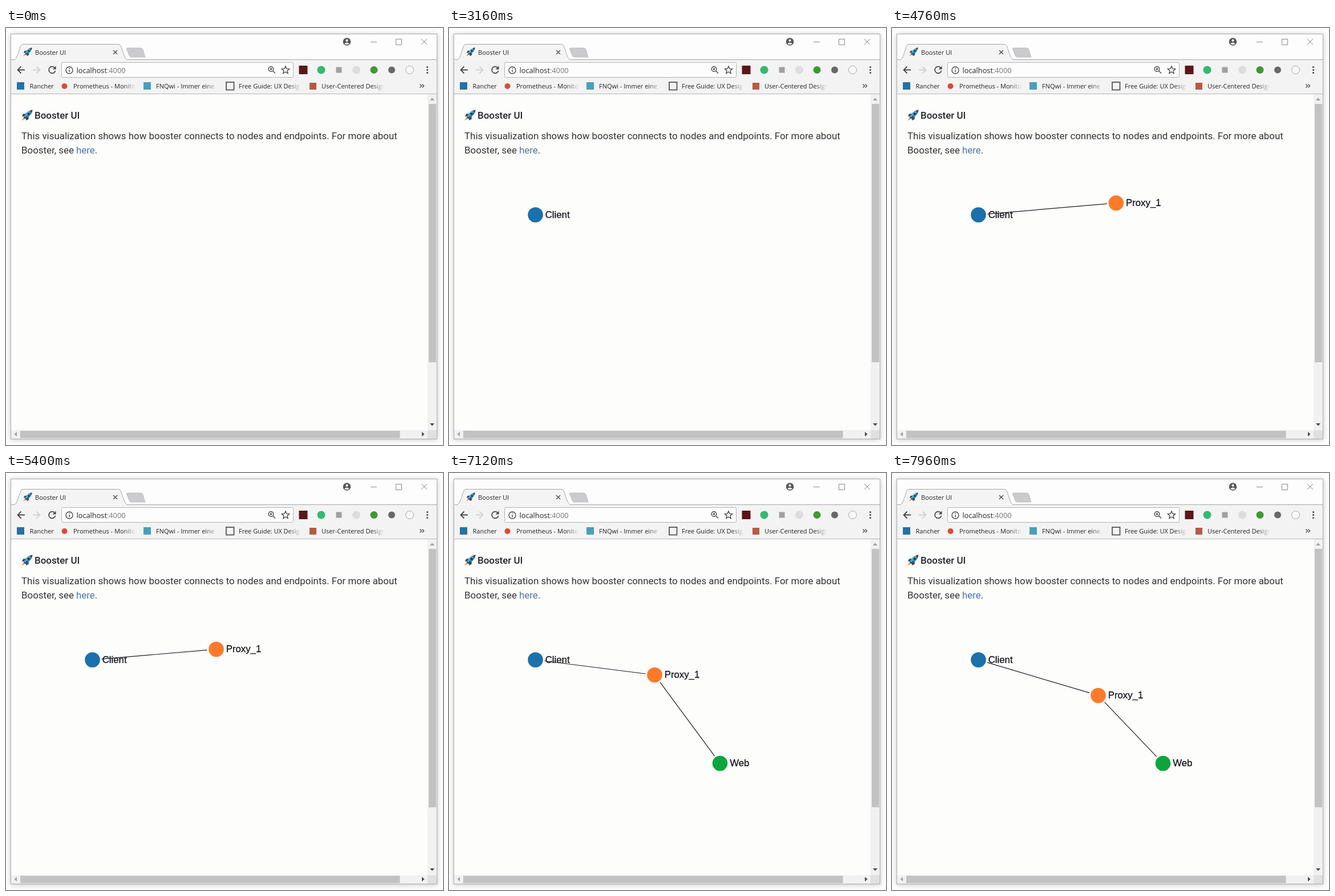
Write an HTML page that moves like this. It is 766x731 px and loops after 8000 ms.

```html
<!DOCTYPE html>
<html lang="en">
<head>
<meta charset="utf-8">
<title>Booster UI</title>
<style>
  html, body { margin: 0; width: 100%; height: 100%; overflow: hidden; background: #fefefe; }
  .window {
    position: absolute; left: 8px; top: 10px; width: 746px; height: 709px;
    border: 1px solid #ababab; background: #fdfdfd;
    box-shadow: 0 1px 9px rgba(0, 0, 0, .22);
  }
  svg { position: absolute; left: 0; top: 0; width: 766px; height: 731px; }
  .ui { font: 11px "Open Sans", sans-serif; fill: #242426; }
  .page { font: 16.9px Roboto, sans-serif; fill: #333335; }
  .node text { font: 16.8px "Liberation Sans", Arial, sans-serif; fill: #15151c; stroke: #15151c; stroke-width: .3; }
  .icon { fill: none; stroke: #4a4a4c; stroke-width: 1.8; }
  .fine { stroke-width: 1.4; }
  .thin { fill: none; stroke: #8a8a8c; stroke-width: 1; }
  .link { stroke: #1c1c20; stroke-width: 1.2; }
</style>
</head>
<body>
<div class="window"></div>
<svg viewBox="0 0 766 731">
  <defs>
    <linearGradient id="fade">
      <stop offset="0" stop-color="#f3f3f3" stop-opacity="0"/>
      <stop offset="1" stop-color="#f3f3f3"/>
    </linearGradient>
    <symbol id="rocket" viewBox="0 0 20 20">
      <path d="M5 12 0 19.5 8 15Z" fill="#f08a3c"/>
      <path d="M8 7 3 7.5 1 12 6 12ZM13 12 12.5 17 8 19 8 14Z" fill="#3d4a5c"/>
      <path d="M19.5 .5C13 1 7 6 4.5 13L7 15.5C14 13 19 7 19.5 .5Z" fill="#2b86b4"/>
      <path d="M19.5 .5C13 1 7 6 4.5 13L5.7 14.2Z" fill="#4fa9d0"/>
      <path d="M19.5 .5 14.5 2 18 5.5Z" fill="#5b3540"/>
      <circle cx="12.5" cy="7.5" r="2" fill="#20303f"/>
      <path d="M4.5 13 7 15.5 10 12" fill="none" stroke="#26364a" stroke-width="1.3"/>
    </symbol>
  </defs>

  <!-- toolbar and tab -->
  <path d="M9 56H755V115H9Z" fill="#f3f3f3"/>
  <path d="M9 55.5H15C19 54 22 42 25.5 32Q26.5 28.5 30 28.5H196Q200 28.5 201.5 32C205 42 208 54 212 55.5H755" fill="#f4f4f4" stroke="#a6a6a8"/>
  <path d="M213 35H236Q239 35 240 38L244 51H220Q217 51 216 48L211.5 37Q211 35 213 35Z" fill="#cbcbcd" stroke="#b6b6b8" stroke-width=".8"/>
  <path d="M9 115.5H755" stroke="#b4b4b6"/>
  <use href="#rocket" x="30" y="34" width="16" height="16"/>
  <text class="ui" x="51" y="46.5">Booster UI</text>
  <path class="icon fine" d="m188 39 7 7m0-7-7 7"/>

  <!-- window controls -->
  <circle cx="597.5" cy="24" r="6.8" fill="#55555a"/>
  <circle cx="597.5" cy="21.8" r="2.1" fill="#fff"/>
  <path d="M593.3 27.5Q597.5 23.5 601.7 27.5Q597.5 30.5 593.3 27.5Z" fill="#fff"/>
  <path class="thin" d="M639 24.5H650M683.5 19.5H693.5V29.5H683.5ZM728 19 738 29M738 19 728 29"/>

  <!-- navigation -->
  <path class="icon" d="M33 73.5H21M26.5 67.5 20.5 73.5 26.5 79.5"/>
  <path class="icon" d="M47 73.5H59M53.5 67.5 59.5 73.5 53.5 79.5" style="stroke:#d2d2d4"/>
  <path class="icon" d="M85.5 70A5.8 5.8 0 1 0 86.5 75"/>
  <path d="M87.5 66.5V72.5H81.5Z" fill="#4a4a4c"/>
  <rect x="97.5" y="60.5" width="406" height="26" rx="2" fill="#fdfdfd" stroke="#b2b2b4"/>
  <g class="icon fine">
    <circle cx="111" cy="74" r="6"/>
    <path d="M111 73V77.5M111 70V71.6"/>
    <circle cx="464.5" cy="72" r="4.3"/>
    <path d="m467.8 75.3 4.2 4.2M462.5 72h4M464.5 70v4"/>
    <path d="m490 67 1.9 4.4 4.7.4-3.6 3.1 1.1 4.6-4.1-2.5-4.1 2.5 1.1-4.6-3.6-3.1 4.7-.4Z"/>
  </g>
  <text class="ui" x="123.5" y="78.5" style="font-size:12.75px">localhost<tspan fill="#77777a">:4000</tspan></text>

  <!-- extensions -->
  <rect x="513.5" y="66" width="15" height="15" fill="#5c1518"/>
  <circle cx="552.5" cy="73.5" r="7" fill="#35b96f"/>
  <rect x="578.5" y="68.5" width="10" height="10" fill="#a0a0a2"/>
  <circle cx="614" cy="73.5" r="7" fill="#dddddf"/>
  <circle cx="645" cy="73.5" r="6.5" fill="#3d9a2f"/>
  <circle cx="676" cy="73.5" r="6" fill="#68686a"/>
  <circle cx="707.5" cy="73.5" r="7" fill="#f8f8f8" stroke="#a5a5a7"/>
  <g fill="#4a4a4c">
    <circle cx="738.5" cy="68.5" r="1.6"/>
    <circle cx="738.5" cy="73.5" r="1.6"/>
    <circle cx="738.5" cy="78.5" r="1.6"/>
  </g>

  <!-- bookmarks -->
  <rect x="19" y="95" width="13" height="13" fill="#2672a3"/>
  <circle cx="102.5" cy="102" r="5" fill="#dc4a38"/>
  <rect x="241" y="95" width="13" height="13" fill="#4a9fb8"/>
  <rect class="icon" x="386" y="95" width="13.5" height="13.5" style="stroke:#55555a"/>
  <rect x="532" y="96" width="12" height="12" fill="#b75a42"/>
  <g class="ui" id="marks"><text x="41.5" y="105.5">Rancher</text></g>
  <path class="icon fine" d="m725.5 98.5 3 3-3 3m4-6 3 3-3 3"/>

  <!-- page -->
  <path d="M9 116H739V705H9Z" fill="#fdfdfc"/>
  <use href="#rocket" x="27" y="143" width="20" height="20"/>
  <g class="page">
    <text x="50" y="158.5" font-weight="500" fill="#24242a">Booster UI</text>
    <text x="27" y="195">This visualization shows how booster connects to nodes and endpoints. For more about</text>
    <text x="27" y="219.5">Booster, see <tspan fill="#4a74a8">here</tspan>.</text>
  </g>

  <!-- scrollbars -->
  <path d="M739 116H755V720H9V705H739Z" fill="#f1f1f1"/>
  <path d="M739 705H755V720H739Z" fill="#e0e0e0"/>
  <path d="M741 133H754V586H741ZM25 706H690.5V719H25Z" fill="#c2c2c2"/>
  <path d="M743 127H751L747 122.5ZM19 708V716L14.5 712Z" fill="#a0a0a0"/>
  <path d="M743 693H751L747 697.5ZM729 708V716L733.5 712Z" fill="#4a4a4c"/>

  <g id="graph"></g>
</svg>
<script>
  const LOOP = 8000, STEP = 80, GAP = 16;
  const NS = 'http://www.w3.org/2000/svg';
  const graph = document.getElementById('graph');
  const marks = document.getElementById('marks');

  function add(parent, tag, attrs, text) {
    const el = document.createElementNS(NS, tag);
    for (const key in attrs) el.setAttribute(key, attrs[key]);
    if (text) el.textContent = text;
    return parent.appendChild(el);
  }

  // Bookmark labels are cut off with a soft edge.
  [
    [118, 228, 'Prometheus - Monito'],
    [263, 371, 'FNQwi - Immer eine'],
    [408, 517, 'Free Guide: UX Desig'],
    [553, 663, 'User-Centered Design']
  ].forEach(([x, end, label]) => {
    add(marks, 'text', { x, y: 105.5 }, label);
    add(marks, 'rect', { x: end - 22, y: 94, width: 22, height: 16, fill: 'url(#fade)' });
    add(marks, 'rect', { x: end, y: 94, width: 12, height: 16, fill: '#f3f3f3' });
  });

  function makeNode(label, color, start, x, y) {
    const el = add(graph, 'g', { class: 'node' });
    add(el, 'circle', { r: 13.3, fill: color });
    add(el, 'text', { x: 17.2, y: 5.2 }, label);
    return { el, start, x, y };
  }

  const client = makeNode('Client', '#1c70ab', 1680, 151.5, 327.5);
  const proxy = makeNode('Proxy_1', '#ff7a2b', 4360, 0, 0);
  const web = makeNode('Web', '#0ca53c', 6960, 475, 509);
  const nodes = [client, proxy, web];
  const links = [[client, proxy], [proxy, web]]
    .map(([a, b]) => ({ a, b, el: add(graph, 'line', { class: 'link' }) }));

  // Proxy path: time, x, y
  const path = [
    [4360, 408, 305.5], [5400, 368.5, 309], [6200, 346, 311], [6960, 332, 312.5],
    [7080, 360.5, 354], [7400, 362, 375], [7960, 361.5, 390]
  ];

  function proxyAt(t) {
    const i = path.findIndex(p => p[0] > t);
    if (i === 0) return path[0].slice(1);
    if (i < 0) return path[path.length - 1].slice(1);
    const [t0, x0, y0] = path[i - 1], [t1, x1, y1] = path[i];
    const k = (t - t0) / (t1 - t0);
    return [x0 + (x1 - x0) * k, y0 + (y1 - y0) * k];
  }

  function show(el, on) {
    el.setAttribute('visibility', on ? 'visible' : 'hidden');
  }

  function draw(now) {
    const t = now % LOOP;
    const tick = Math.floor((t - 40) / STEP) * STEP + 40;
    [proxy.x, proxy.y] = proxyAt(tick);
    for (const n of nodes) {
      n.el.setAttribute('transform', `translate(${n.x} ${n.y})`);
      show(n.el, t >= n.start);
    }
    for (const { a, b, el } of links) {
      const dx = b.x - a.x, dy = b.y - a.y, k = GAP / Math.hypot(dx, dy);
      el.setAttribute('x1', a.x + dx * k);
      el.setAttribute('y1', a.y + dy * k);
      el.setAttribute('x2', b.x - dx * k);
      el.setAttribute('y2', b.y - dy * k);
      show(el, t >= Math.max(a.start, b.start));
    }
  }

  const begin = performance.now();
  function frame() {
    draw(performance.now() - begin);
    requestAnimationFrame(frame);
  }
  frame();
</script>
</body>
</html>
```
